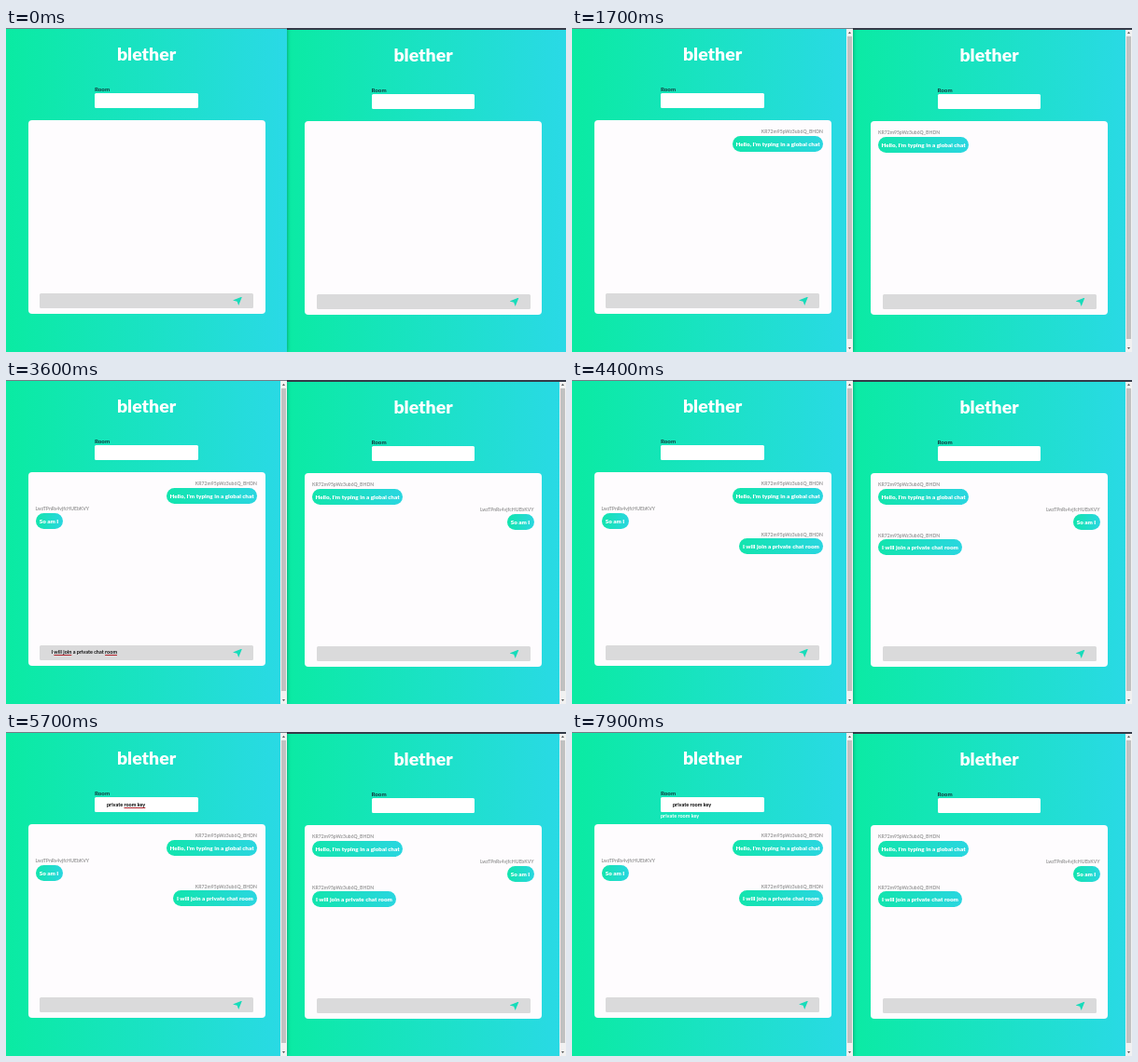
An HTML page that plays this animation: 600 px wide and 348 px high, repeating every 8000 ms.

```html
<!DOCTYPE html>
<html lang="en">
<head>
<meta charset="utf-8">
<title>Two chat windows</title>
<style>
html, body { margin: 0; width: 100%; height: 100%; overflow: hidden; }
body { position: relative; font: 700 5.5px Lato, sans-serif; background: #2adbe6; }
div { position: absolute; box-sizing: border-box; white-space: pre; }
.pane { inset: 0; overflow: hidden; background: linear-gradient(90deg, #0aeba2, #2ad9e6); }
.win { top: 0; height: 348px; box-shadow: 0 0 4px #0006; }
#left { left: 0; width: 301px; z-index: 1; }
#right { left: 293.5px; width: 306.5px; }
.page { left: 0; top: 0; width: 301px; height: 348px; }
#right .page { left: 3px; top: 1px; }
.edge { left: 0; top: 0; width: 100%; height: 1px; background: #777c86; }
#right .edge { height: 1.6px; background: #343a48; }
.title { left: 0; width: 301px; top: 14px; text-align: center; font-size: 19.5px; font-weight: 900; line-height: 28px; color: #fff; }
.label { left: 95px; top: 61px; font-size: 6.2px; line-height: 9px; color: #12343a; }
.room { left: 95px; top: 70px; width: 110.5px; height: 16px; padding-left: 13px; line-height: 16px; border-radius: 1.5px; background: #fff; }
.joined { left: 95px; top: 86px; line-height: 9px; color: #fff; }
.card { left: 23.5px; top: 98.5px; width: 254px; height: 208.5px; border-radius: 4px; background: #fefcfe; }
.entry { left: 36px; top: 285px; width: 229px; height: 15.5px; padding-left: 12.5px; line-height: 15.5px; border-radius: 1.5px; background: #dadadb; color: #111; }
.caret { left: 48.3px; top: 289px; width: .8px; height: 8px; background: #444; }
.send { left: 243px; top: 288.5px; width: 10px; height: 9.5px; background: #16dcba; clip-path: polygon(100% 0, 0 42%, 46% 54%, 62% 100%); }
.from { font-size: 5.1px; line-height: 8px; color: #999; }
.bubble { height: 17px; line-height: 17px; border-radius: 8.5px; text-align: center; font-size: 6.3px; font-weight: 900; color: #fff; background: linear-gradient(90deg, #12e5ad, #2ad6e0); }
.bar { right: 0; top: 1px; width: 7px; height: 347px; background: #f1f1f1; }
.thumb { left: 1px; top: 8px; width: 5px; height: 325px; background: #c1c1c1; }
.up, .down { left: 2px; width: 3px; height: 2px; background: #505050; clip-path: polygon(50% 0, 100% 100%, 0 100%); }
.up { top: 3px; }
.down { bottom: 3px; transform: scaleY(-1); }
u { text-decoration: underline #b0242c .6px; text-underline-offset: .8px; }
</style>
</head>
<body>
<script>
const LOOP = 8000;
const ids = { left: 'KR72m95pWz3ub6Q_BHDN', right: 'LwzTPnRs4vjfcHUEbKVY' };
const messages = [
  { by: 'left', text: "Hello, I'm typing in a global chat", width: 97, start: 100, end: 1000, sent: 1200 },
  { by: 'right', text: 'So am I', width: 29, start: 2000, end: 2500, sent: 2600 },
  { by: 'left', text: 'I will join a private chat room', width: 90, start: 2950, end: 3550, sent: 3900 }
];
const key = { text: 'private room key', start: 5050, end: 5650, sent: 6200 };

const bubbles = side => messages.map((m, i) => {
  const top = 107 + 27.4 * i;
  const edge = m.by === side ? 'right:32px' : 'left:31.5px';
  return `<div class="from" data-msg="${i}" style="${edge};top:${top}px">${ids[m.by]}</div>
    <div class="bubble" data-msg="${i}" style="${edge};top:${top + 8.5}px;width:${m.width}px">${m.text}</div>`;
}).join('');

const pane = side => `<div class="win" id="${side}"><div class="pane">
  <div class="page">
    <div class="title">blether</div>
    <div class="label">Room</div><div class="room"></div><div class="joined">${side === 'left' ? key.text : ''}</div>
    <div class="card"></div>${bubbles(side)}
    <div class="entry"></div><div class="caret"></div><div class="send"></div>
  </div>
  <div class="bar"><div class="up"></div><div class="thumb"></div><div class="down"></div></div>
  <div class="edge"></div>
</div></div>`;

document.body.insertAdjacentHTML('afterbegin', pane('left') + pane('right'));
const $ = s => document.querySelector(s);
const show = (el, on) => { el.style.visibility = on ? 'inherit' : 'hidden'; };
const all = (s, on) => document.querySelectorAll(s).forEach(el => show(el, on));

function typed({ text, start, end }, t) {
  const p = Math.min(1, Math.max(0, (t - start) / (end - start)));
  return text.slice(0, Math.round(p * text.length));
}
const spell = s => s.replace(/will join|room key|room/g, '<u>$&</u>');

function draw(t) {
  for (const side of ['left', 'right']) {
    const m = messages.find(m => m.by === side && t >= m.start && t < m.sent);
    $(`#${side} .entry`).innerHTML = m ? spell(typed(m, t)) : '';
  }
  messages.forEach((m, i) => all(`[data-msg="${i}"]`, t >= m.sent));
  all('.bar', t >= messages[0].sent);
  all('.caret', false);
  show($('#left .caret'), t >= 4000 && t < 5000 && Math.floor(t / 500) % 2);
  const joined = t >= key.sent;
  const name = typed(key, t);
  $('#left .room').innerHTML = joined ? name : spell(name);
  show($('#left .joined'), joined);
  $('#right').style.zIndex = t >= 1900 && t < 2950 ? 2 : 0;
}

function tick() {
  draw(performance.now() % LOOP);
  requestAnimationFrame(tick);
}
tick();
</script>
</body>
</html>
```
